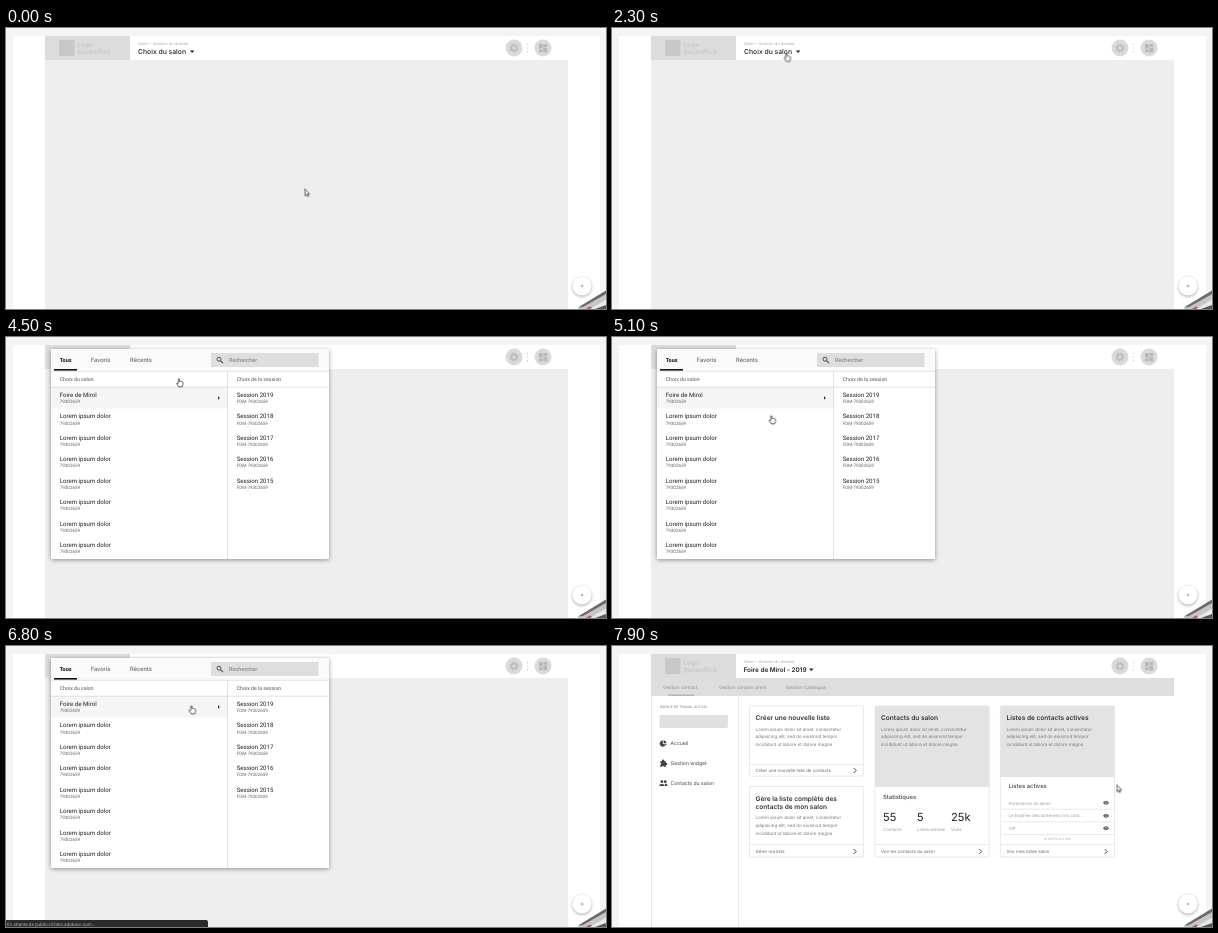
Recreate the animation shown at these times as an HTML page. Size 600x281 px, loop 8000 ms.

```html
<!DOCTYPE html>
<html lang="fr">
<head>
<meta charset="utf-8">
<title>Choix du salon</title>
<style>
html, body { margin: 0; width: 100%; height: 100%; overflow: hidden; background: #f4f4f4; }
svg { display: block; width: 100vw; height: 100vh; }
text { font: 4.5px Inter, "Open Sans", sans-serif; fill: #777; text-rendering: geometricPrecision; }
.panel text { font: 6.1px Roboto, Arial, sans-serif; fill: #222; }
.panel text.code { font-size: 4.55px; fill: #666; }
.panel text.head { font-size: 5.2px; fill: #555; }
.panel text.tab { font-size: 6px; fill: #555; letter-spacing: .05px; }
.panel text.on { font-size: 5.5px; font-weight: 700; fill: #111; }
.panel text.find { font-size: 5.6px; fill: #777; }
text.logo { font-size: 6.4px; font-weight: 700; fill: #c9c9c9; }
text.crumb { font-size: 4px; fill: #aaa; }
text.pick { font-size: 6.8px; font-weight: 500; fill: #222; }
text.fair { font-size: 6.4px; font-weight: 600; fill: #222; }
text.nav { font-size: 4.6px; fill: #8c8c8c; }
text.side { font-size: 5.1px; fill: #444; }
text.title { font-size: 6.55px; font-weight: 600; fill: #333; }
text.sub { font-size: 5.9px; font-weight: 500; fill: #444; }
text.big { font-size: 11.2px; fill: #222; }
text.tiny { font-size: 4.4px; fill: #999; }
text.link { font-size: 4.45px; fill: #666; }
.rule { stroke: #e2e2e2; stroke-width: .8; }
.card { fill: #fff; stroke: #e2e2e2; stroke-width: .8; }
.chev { fill: none; stroke: #444; stroke-width: 1; }
.panel > .sheet { filter: drop-shadow(0 1px 2px rgba(0,0,0,.4)); }
.fab { filter: drop-shadow(0 1px 1.5px rgba(0,0,0,.35)); }

.start, .panel, .dash, .status, .arrow, .hand, .cursor {
  animation: 8s step-end infinite;
}
.start { animation-name: start; }
.panel { animation-name: panel; }
.dash { animation-name: dash; }
.status { animation-name: status; }
.arrow { animation-name: arrow; }
.hand { animation-name: hand; }
.cursor { animation-name: move; }
@keyframes start { 0% { opacity: 1 } 88.75%, 100% { opacity: 0 } }
@keyframes panel { 0% { opacity: 0 } 47.5% { opacity: 1 } 88.75%, 100% { opacity: 0 } }
@keyframes dash { 0% { opacity: 0 } 88.75%, 100% { opacity: 1 } }
@keyframes status { 0% { opacity: 0 } 82.5% { opacity: 1 } 88.75% { opacity: .77 } 91.25%, 100% { opacity: 0 } }
@keyframes arrow { 0% { opacity: 1 } 28.75% { opacity: 0 } 88.75%, 100% { opacity: 1 } }
@keyframes hand { 0% { opacity: 0 } 28.75% { opacity: 1 } 88.75%, 100% { opacity: 0 } }
@keyframes move {
  0% { transform: translate(298.5px, 160.5px) }
  13.75% { transform: translate(280px, 143.5px) }
  16.25% { transform: translate(257px, 125.5px) }
  18.75% { transform: translate(236px, 102px) }
  20% { transform: translate(213px, 79px) }
  21.25% { transform: translate(199.5px, 64.5px) }
  23.75% { transform: translate(181px, 42.5px) }
  26.25% { transform: translate(174px, 28px) }
  28.75% { transform: translate(171.5px, 24.5px) }
  51.25% { transform: translate(171px, 27px) }
  52.5% { transform: translate(170px, 33px) }
  53.75% { transform: translate(171px, 38.5px) }
  56.25% { transform: translate(170px, 41px) }
  57.5% { transform: translate(169px, 46px) }
  58.75% { transform: translate(166px, 53px) }
  60% { transform: translate(163px, 60px) }
  61.25% { transform: translate(160px, 67px) }
  62.5% { transform: translate(157px, 73px) }
  63.75% { transform: translate(156.5px, 78px) }
  65% { transform: translate(164px, 88px) }
  66.25% { transform: translate(176px, 97px) }
  67.5% { transform: translate(190px, 104px) }
  68.75% { transform: translate(207px, 111px) }
  70% { transform: translate(222px, 118px) }
  71.25% { transform: translate(231px, 121px) }
  75% { transform: translate(234px, 113px) }
  76.25% { transform: translate(223.5px, 102.5px) }
  78.75% { transform: translate(214px, 90px) }
  80% { transform: translate(205px, 80px) }
  81.25% { transform: translate(197px, 72px) }
  82.5% { transform: translate(190px, 65px) }
  83.75% { transform: translate(185px, 61px) }
  85% { transform: translate(182.5px, 59px) }
  88.75% { transform: translate(194.5px, 69px) }
  91.25% { transform: translate(215px, 75px) }
  92.5% { transform: translate(262px, 89px) }
  93.75% { transform: translate(325px, 109px) }
  95% { transform: translate(388px, 127px) }
  96.25% { transform: translate(434.5px, 138.5px) }
  98.75%, 100% { transform: translate(504.5px, 138.5px) }
}
</style>
</head>
<body>
<svg viewBox="0 0 600 281" preserveAspectRatio="none">
  <defs>
    <path id="chev" class="chev" d="M-1.2-2.4 1.2 0-1.2 2.4"/>
    <g id="eye">
      <path d="M-3 0Q0-4 3 0Q0 4-3 0Z" fill="#444"/>
      <circle r="1.1" fill="#444" stroke="#fff" stroke-width=".5"/>
    </g>
  </defs>

  <rect width="600" height="281" fill="#f4f4f4"/>
  <rect x="7" y="8" width="587" height="273" fill="#fff"/>
  <rect x="39" y="8" width="85" height="24" fill="#dcdcdc"/>
  <rect x="53" y="12" width="15.500" height="16" fill="#c8c8c8"/>
  <text class="logo" x="71.500" y="18.500">Logo</text>
  <text class="logo" x="71.500" y="25.700">Backoffice</text>
  <text class="crumb" x="132" y="17.300">Salon – Session du dossier</text>

  <circle cx="508" cy="20" r="8.500" fill="#dadada"/>
  <circle cx="508" cy="20" r="2.700" fill="none" stroke="#bdbdbd" stroke-width="1.700"/>
  <circle cx="508" cy="20" r="4" fill="none" stroke="#bdbdbd" stroke-width="1.200" stroke-dasharray="1.570"/>
  <g fill="#c4c4c4">
    <circle cx="521.500" cy="16.300" r=".6"/><circle cx="521.500" cy="20" r=".6"/><circle cx="521.500" cy="23.700" r=".6"/>
  </g>
  <circle cx="537" cy="20" r="8.500" fill="#dadada"/>
  <path d="M533 16h3.600v4.600H533zM537.400 16h3.800v3h-3.800zM533 21.400h3.600v2.800H533zM537.400 19.800h3.800v4.400h-3.800z" fill="#b8b8b8"/>

  <g class="start">
    <rect x="39" y="32" width="523" height="249" fill="#eee"/>
    <text class="pick" x="132" y="25.800">Choix du salon</text>
    <path d="M183.800 22.500h4.600l-2.300 2.400z" fill="#222"/>
  </g>

  <g class="dash">
    <text class="fair" x="131.500" y="25.800">Foire de Mirol - 2019</text>
    <path d="M197 22.500h4.600l-2.300 2.400z" fill="#222"/>
    <rect x="39" y="32" width="523" height="18" fill="#dedede"/>
    <text class="nav" x="51" y="42.500">Gestion contact</text>
    <text class="nav" x="107" y="42.500">Gestion compte client</text>
    <text class="nav" x="174" y="42.500">Gestion Catalogue</text>
    <rect x="56" y="48.500" width="26" height="1.500" fill="#b5b5b5"/>
    <path class="rule" d="M39.500 50V281M126.500 50V281"/>
    <text x="48" y="62.300" style="font-size:3.4px">ESPACE DE TRAVAIL ACTUEL</text>
    <rect x="48" y="69.500" width="67.500" height="12" rx=".8" fill="#e0e0e0" stroke="#d2d2d2" stroke-width=".5"/>
    <g fill="#444">
      <path d="M50.700 94.300A3.200 3.200 0 1 0 53.500 99.300L50.700 97.500Z"/>
      <path d="M51.600 94.300A3.200 3.200 0 0 1 54.500 97.200H51.600ZM51.700 98H54.500A3.200 3.200 0 0 1 53.900 99.300Z"/>
      <path d="M48.300 115.300h1.700a1.200 1.200 0 1 1 2.200 0h1.700v1.700a1.100 1.100 0 1 1 0 2.100v1.600h-1.800a1.100 1.100 0 0 0-2.100 0h-1.700v-1.800a1.100 1.100 0 0 0 0-2.100z"/>
      <circle cx="49.900" cy="135.700" r="1.400"/><circle cx="53.300" cy="135.700" r="1.400"/>
      <path d="M47.300 140v-1q2.600-2.200 5.200 0v1zM53.100 140v-1.300l-.6-.8q2.200-.6 3 1.100v1z"/>
    </g>
    <text class="side" x="58.500" y="99.200">Accueil</text>
    <text class="side" x="58.500" y="119.200">Gestion widget</text>
    <text class="side" x="58.500" y="139.200">Contacts du salon</text>

    <rect class="card" x="137.400" y="59.900" width="114.200" height="70.200" rx="1.500"/>
    <text class="title" x="143.500" y="74">Créer une nouvelle liste</text>
    <rect class="card" x="137.400" y="140.500" width="114.200" height="70.600" rx="1.500"/>
    <text class="title" x="143.500" y="154.800">Gère la liste complète des</text>
    <text class="title" x="143.500" y="162.800">contacts de mon salon</text>
    <rect class="card" x="263" y="59.900" width="114.200" height="151.200" rx="1.500"/>
    <path d="M263 141V61.500q0-1.500 1.500-1.500h111.200q1.500 0 1.500 1.500V141z" fill="#e3e3e3"/>
    <text class="title" x="269" y="74">Contacts du salon</text>
    <rect class="card" x="388.400" y="59.900" width="114.200" height="151.200" rx="1.500"/>
    <path d="M388.400 131V61.500q0-1.500 1.500-1.500h111.200q1.500 0 1.500 1.500V131z" fill="#e3e3e3"/>
    <text class="title" x="394.500" y="74">Listes de contacts actives</text>
    <g id="body"></g>

    <path class="rule" d="M137.400 118.500h114.200M137.400 198.500h114.200M263 198.500h114.200M388.400 198.500h114.200M390 163.200h112.500M390 175.900h112.500M390 188.600h112.500"/>
    <text class="link" x="143.500" y="126">Créer une nouvelle liste de contacts</text>
    <text class="link" x="143.500" y="206.700">Gérer ma liste</text>
    <text class="link" x="269" y="206.700">Voir les contacts du salon</text>
    <text class="link" x="394.500" y="206.700">Voir mes listes salon</text>
    <use href="#chev" x="243" y="124.500"/><use href="#chev" x="243" y="205.500"/>
    <use href="#chev" x="368.500" y="205.500"/><use href="#chev" x="494" y="205.500"/>

    <text class="sub" x="271" y="152.800">Statistiques</text>
    <text class="big" x="271" y="174.500">55</text>
    <text class="big" x="305" y="174.500">5</text>
    <text class="big" x="339" y="174.500">25k</text>
    <text class="tiny" x="271" y="184.500">Contacts</text>
    <text class="tiny" x="305" y="184.500">Listes actives</text>
    <text class="tiny" x="339" y="184.500">Vues</text>

    <text class="sub" x="396.500" y="142">Listes actives</text>
    <text class="tiny" x="396.500" y="158.500">Partenaires du salon</text>
    <text class="tiny" x="396.500" y="171.200">Le trophée des lanternes nos cont...</text>
    <text class="tiny" x="396.500" y="183.900">VIP</text>
    <use href="#eye" x="494" y="156.800"/><use href="#eye" x="494" y="169.700"/><use href="#eye" x="494" y="182.300"/>
    <text x="445.500" y="194.300" text-anchor="middle" style="font-size:3px;fill:#aaa">18 LISTES ACTIVES</text>
  </g>

  <g class="panel">
    <rect class="sheet" x="45" y="12" width="278" height="210" fill="#fff"/>
    <rect x="45" y="12" width="278" height="22" fill="#fafafa"/>
    <rect x="45" y="50" width="176.500" height="21.400" fill="#f5f5f5"/>
    <path d="M45 34.300H323M45 50.200H323M221.500 34V222" stroke="#dcdcdc" stroke-width=".8"/>
    <text class="on" x="53.700" y="25">Tous</text>
    <text class="tab" x="84.700" y="25">Favoris</text>
    <text class="tab" x="124" y="25">Récents</text>
    <rect x="48" y="32" width="23" height="1.600" fill="#111"/>
    <rect x="205" y="16" width="107.500" height="14" fill="#dedede"/>
    <circle cx="213" cy="22.200" r="2" fill="none" stroke="#444" stroke-width=".9"/>
    <path d="M214.500 23.700l2.500 2.500" stroke="#444" stroke-width="1.100"/>
    <text class="find" x="223" y="25">Rechercher</text>
    <text class="head" x="53.700" y="43.900">Choix du salon</text>
    <text class="head" x="230.700" y="43.900">Choix de la session</text>
    <path d="M212 59l1.900 1.900-1.900 1.900z" fill="#333"/>
    <g id="rows"></g>
  </g>

  <circle class="fab" cx="576" cy="258" r="9.500" fill="#fff"/>
  <path d="M574.700 258h2.800M576.100 256.600v2.800" stroke="#999" stroke-width=".8"/>
  <path d="M573 279L600 263V281H572z" fill="#c6c6c6"/>
  <path d="M572 279.500L600 262.500V266L577 279z" fill="#6b6b6b"/>
  <path d="M584 281L600 271.500V281z" fill="#e9e9e9"/>
  <path d="M589 281L600 277V281z" fill="#555"/>
  <path d="M580 281l4-2.500 2 1-2 1.500z" fill="#b5544c"/>

  <g class="status">
    <path d="M0 274H200q2 0 2 2V281H0z" fill="#2b2b2b"/>
    <text x="1" y="279.500" style="font:4.6px Roboto,Arial,sans-serif;fill:#b4b4b4">En attente de public-v2links.adobecc.com...</text>
  </g>

  <g class="cursor" stroke="#222" stroke-width=".7" stroke-linejoin="round" fill="#fff">
    <path class="arrow" d="M.4.400V7.200L1.900 5.800 2.900 8 4 7.500 3 5.400H5z"/>
    <path class="hand" d="M2.200 5.400V1.200q.7-1.100 1.400 0V3.500q.8-.5 1.300.2.800-.4 1.200.3.900-.2.900.8V6.700L6.200 8.900H2.800L.7 5.800q0-1.200 1.500-.4z"/>
  </g>
</svg>
<script>
const add = (parent, x, y, str, cls = "") => {
  const t = document.createElementNS("http://www.w3.org/2000/svg", "text");
  t.setAttribute("x", x);
  t.setAttribute("y", y);
  t.setAttribute("class", cls);
  t.textContent = str;
  document.getElementById(parent).append(t);
};

const lorem = [
  "Lorem ipsum dolor sit amet, consectetur",
  "adipiscing elit, sed do eiusmod tempor",
  "incididunt ut labore et dolore magna"
];
for (const [x, y] of [[143.5, 84.5], [143.5, 173.3], [269, 84.5], [394.5, 84.5]])
  lorem.forEach((line, i) => add("body", x, y + i * 7.85, line));

for (let i = 0; i < 8; i++) {
  const y = 60 + i * 21.42;
  add("rows", 53.7, y, i ? "Lorem ipsum dolor" : "Foire de Mirol");
  add("rows", 53.7, y + 6.1, "79302659", "code");
  if (i > 4) continue;
  add("rows", 230.7, y, "Session " + (2019 - i));
  add("rows", 230.7, y + 6.1, "FDM-79302659", "code");
}
</script>
</body>
</html>
```
